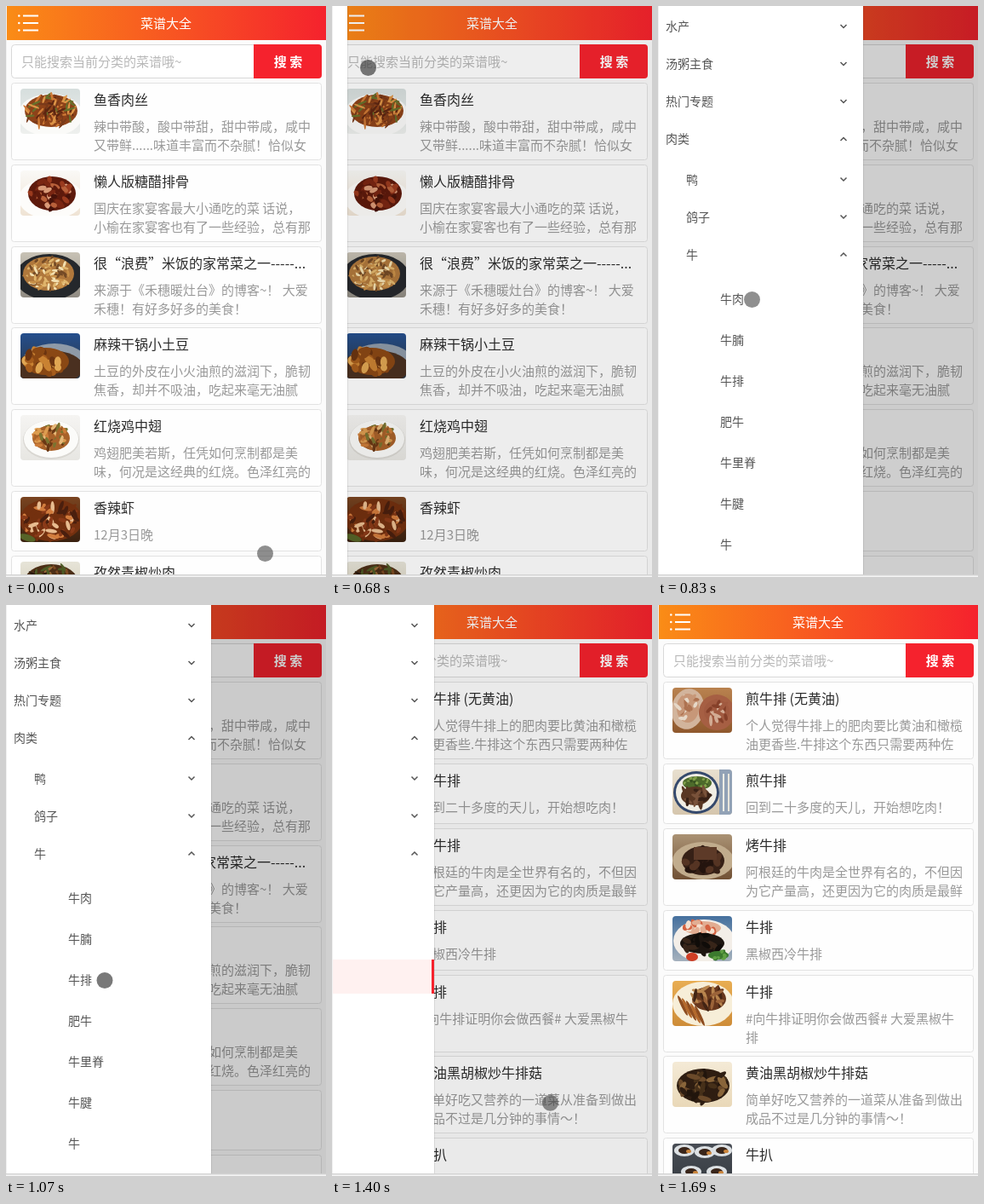
Write an HTML page with a canvas that moves like this. It is 376x670 px and loops after 2.49 s.

```html
<!DOCTYPE html>
<html lang="zh-CN">
<head>
<meta charset="utf-8">
<title>菜谱大全</title>
<style>
html, body { margin: 0; width: 100%; height: 100%; overflow: hidden; background: #fff; }
canvas { display: block; width: 376px; height: 670px; }
</style>
</head>
<body>
<canvas id="stage"></canvas>
<script>
const W = 376, H = 670, LOOP = 2490, FLOOR = 667;
const FONT = '"Noto Sans CJK SC", "Noto Sans CJK", "Noto Sans CJK JP", sans-serif';
const RED = '#f5222d';
const canvas = document.getElementById('stage');
const ctx = canvas.getContext('2d');
const dpr = window.devicePixelRatio || 1;
canvas.width = W * dpr;
canvas.height = H * dpr;

// The screen refreshes only at these moments (ms).
const STEPS = [0, 70, 150, 220, 370, 450, 610, 680, 770, 830, 920, 1000, 1070,
  1140, 1220, 1310, 1400, 1460, 1540, 1620, 1690];

// Keyframes: [time, value, ...]
const CURSOR = [[0, 304.5, 642.5], [150, 78, 34], [370, 30, 20], [450, 26.5, 17.5],
  [610, 32, 36], [680, 42.5, 72.5], [830, 110.5, 344.5], [920, 118, 425], [1000, 116, 440],
  [1140, 116, 441], [1220, 150, 468], [1310, 211.5, 519.5], [1460, 286.5, 627.5],
  [1620, 306.5, 666.5]];
const EDGE = [[610, 0], [680, 18], [770, 165], [830, 241], [1220, 241], [1310, 240],
  [1400, 120], [1460, 17], [1540, 0]];
const DIM = [[600, 0], [680, .065], [830, .19], [860, .2], [1180, .2], [1310, .135],
  [1460, .04], [1540, 0]];
const GLOW = [[1140, 0], [1310, .75], [1400, 1]];

function track(keys, t) {
  if (t <= keys[0][0]) return keys[0].slice(1);
  for (let i = 1; i < keys.length; i++) {
    const a = keys[i - 1], b = keys[i];
    if (t <= b[0]) {
      const k = (t - a[0]) / (b[0] - a[0]);
      return a.slice(1).map((v, j) => v + (b[j + 1] - v) * k);
    }
  }
  return keys[keys.length - 1].slice(1);
}

function text(s, x, cy, size, color, align = 'left', weight = 400) {
  ctx.font = `${weight} ${size}px ${FONT}`;
  ctx.textAlign = align;
  ctx.fillStyle = color;
  ctx.fillText(s, x, cy + size * .38);
}

function rect(x, y, w, h, color) {
  ctx.fillStyle = color;
  ctx.fillRect(x, y, w, h);
}

function panel(x, y, w, h, r, fill, stroke) {
  ctx.beginPath();
  ctx.roundRect(x, y, w, h, r);
  ctx.fillStyle = fill;
  ctx.fill();
  if (stroke) {
    ctx.strokeStyle = stroke;
    ctx.lineWidth = 1;
    ctx.stroke();
  }
}

// Dish pictures, painted in a 70 x 53 box.
let seed = 1;
function rand() {
  seed = (seed * 16807) % 2147483647;
  return seed / 2147483647;
}

function back(top, bottom) {
  const g = ctx.createLinearGradient(0, 0, 0, 53);
  g.addColorStop(0, top);
  g.addColorStop(1, bottom);
  rect(0, 0, 70, 53, g);
}

function oval(x, y, rx, ry, color, turn = 0) {
  ctx.beginPath();
  ctx.ellipse(x, y, rx, ry, turn, 0, 7);
  ctx.fillStyle = color;
  ctx.fill();
}

function heap(x, y, rx, ry, colors, count, len, thick) {
  oval(x, y, rx, ry, colors[0]);
  for (let i = 0; i < count; i++) {
    const a = rand() * 6.28, d = Math.sqrt(rand()) * .92;
    oval(x + Math.cos(a) * rx * d, y + Math.sin(a) * ry * d, len * (.6 + rand() * .5),
      thick, colors[i % colors.length], rand() * 3.14);
  }
}

function pork() {
  back('#d6dedd', '#eef0ee');
  oval(35, 31, 38, 25, '#fafaf8');
  heap(36, 26, 31, 19, ['#8d4219', '#cf7a35', '#5e2611', '#dd9446', '#7a3a1a', '#66702b'], 85, 7, 1.3);
}
function ribs() {
  back('#faf9f6', '#efe3d4');
  oval(36, 33, 38, 24, '#fdfcfa');
  heap(37, 27, 28, 20, ['#5e1a0c', '#9a3a1e', '#471209', '#b8603a', '#7a2612', '#d99a78'], 40, 6, 2.8);
}
function rice() {
  back('#c8c2b5', '#8f8a82');
  oval(34, 29, 40, 27, '#25282c');
  heap(33, 25, 30, 20, ['#b0783c', '#e0b56c', '#744a26', '#f3e0b0', '#c99149'], 95, 4.5, 1.5);
}
function potato() {
  back('#254f8d', '#2b333e');
  oval(40, 34, 38, 22, '#8e9aa8');
  oval(34, 40, 40, 20, '#4a3020');
  heap(30, 33, 27, 16, ['#8a4814', '#c98232', '#6b3410', '#e0a652', '#a65c1c'], 26, 7, 4);
}
function wings() {
  back('#f5f4f2', '#e7e6e2');
  oval(36, 29, 33, 23, '#d9d7d2');
  oval(36, 28, 32, 22, '#fbfbf9');
  heap(36, 27, 22, 15, ['#a8622a', '#dc9c50', '#6a3814', '#cc7c38', '#e6b878', '#7a7430'], 42, 6, 2);
}
function shrimp() {
  back('#7a4420', '#39200f');
  heap(36, 27, 37, 25, ['#73300f', '#d27c3d', '#8a3a18', '#e8bc90', '#4a1f0e'], 65, 7, 2.3);
  oval(8, 48, 10, 4, '#566428', .3);
}
function pepper() {
  back('#e6e4d8', '#d2c9b2');
  heap(36, 25, 32, 22, ['#4c2e16', '#7c4a22', '#4d5a25', '#2c1c0e', '#9a6a38'], 70, 7, 1.5);
}
function rawSteak() {
  back('#b9824f', '#8f582d');
  oval(18, 25, 19, 24, '#d2b49c', .2);
  oval(52, 29, 21, 21, '#a65f43', -.2);
  heap(18, 24, 13, 17, ['#c79778', '#e6d8c8', '#ae7250'], 18, 6, 2);
  heap(52, 28, 15, 14, ['#a15a40', '#d2ab93', '#854029'], 18, 6, 2);
}
function bluePlate() {
  back('#e8dfcf', '#d5c6ad');
  rect(55, 0, 15, 53, '#92a2b6');
  rect(59, 5, 2, 44, '#f0ede5');
  rect(65, 5, 2, 44, '#e8e5db');
  oval(28, 27, 27, 25, '#35496c');
  oval(28, 27, 24, 22, '#f1eee4');
  heap(29, 16, 17, 8, ['#4d6b2b', '#82a14a', '#365020'], 38, 2, 1.8);
  heap(27, 31, 17, 11, ['#593723', '#79523a', '#382116'], 20, 7, 2);
}
function roast() {
  back('#aa9274', '#715135');
  oval(36, 31, 36, 22, '#c1ac8d');
  heap(36, 31, 25, 17, ['#362016', '#553423', '#24140e'], 18, 8, 4);
  rect(25, 15, 27, 15, '#5d3a28');
}
function mixed() {
  back('#45709e', '#a5b1bd');
  oval(37, 29, 36, 25, '#f3eee8');
  heap(35, 14, 22, 8, ['#e2ad92', '#f5dfce', '#d46140'], 23, 5, 3);
  heap(35, 32, 26, 12, ['#1d1510', '#382519', '#100c09'], 18, 8, 3);
  heap(54, 46, 12, 5, ['#3c7a2e', '#60a044'], 14, 3, 2);
  oval(23, 48, 7, 5, '#cf3e25');
}
function fries() {
  back('#e8ad52', '#ce8c38');
  oval(36, 27, 36, 26, '#f7eed8');
  for (let i = 0; i < 5; i++) oval(12 + i * 5, 29 + i * 3, 2, 13, i % 2 ? '#b4692c' : '#8e4d20', -.45);
  heap(43, 21, 20, 14, ['#67371d', '#9b6339', '#432414', '#b8854e'], 24, 8, 2);
}
function mushroom() {
  back('#f4ead6', '#e9d8b8');
  heap(36, 28, 31, 20, ['#2e1d11', '#6b4a2a', '#463019', '#21150c', '#89653a'], 42, 8, 3);
}
function table() {
  back('#484d55', '#353a40');
  for (const [x, y] of [[14, 8], [38, 10], [58, 8], [22, 33], [52, 33]]) {
    oval(x, y, 12, 7, '#dce0e3');
    oval(x, y, 7, 4, '#39251a');
    oval(x + 5, y + 1, 3, 2, '#cc863d');
  }
}

function photo(paint, x, y, n) {
  ctx.save();
  ctx.beginPath();
  ctx.roundRect(x, y, 70, 53, 4);
  ctx.clip();
  ctx.translate(x, y);
  seed = 977 + n * 7919;
  paint();
  ctx.restore();
}

// Cards: [picture, title, description lines...]
const HOME = [
  [pork, '鱼香肉丝', '辣中带酸，酸中带甜，甜中带咸，咸中', '又带鲜......味道丰富而不杂腻！恰似女'],
  [ribs, '懒人版糖醋排骨', '国庆在家宴客最大小通吃的菜 话说，', '小榆在家宴客也有了一些经验，总有那'],
  [rice, '很“浪费”米饭的家常菜之一-----...', '来源于《禾穗暖灶台》的博客~！ 大爱', '禾穗！有好多好多的美食！'],
  [potato, '麻辣干锅小土豆', '土豆的外皮在小火油煎的滋润下，脆韧', '焦香，却并不吸油，吃起来毫无油腻'],
  [wings, '红烧鸡中翅', '鸡翅肥美若斯，任凭如何烹制都是美', '味，何况是这经典的红烧。色泽红亮的'],
  [shrimp, '香辣虾', '12月3日晚'],
  [pepper, '孜然青椒炒肉', '']
];
const STEAK = [
  [rawSteak, '煎牛排 (无黄油)', '个人觉得牛排上的肥肉要比黄油和橄榄', '油更香些.牛排这个东西只需要两种佐'],
  [bluePlate, '煎牛排', '回到二十多度的天儿，开始想吃肉！'],
  [roast, '烤牛排', '阿根廷的牛肉是全世界有名的，不但因', '为它产量高，还更因为它的肉质是最鲜'],
  [mixed, '牛排', '黑椒西冷牛排'],
  [fries, '牛排', '#向牛排证明你会做西餐# 大爱黑椒牛', '排'],
  [mushroom, '黄油黑胡椒炒牛排菇', '简单好吃又营养的一道菜从准备到做出', '成品不过是几分钟的事情～！'],
  [table, '牛扒', '']
];

function drawHeader() {
  const g = ctx.createLinearGradient(1, 0, W, 0);
  g.addColorStop(0, '#fa8c16');
  g.addColorStop(1, RED);
  rect(1, 0, W - 1, 40, g);
  text('菜谱大全', 188, 20, 15, '#fff', 'center');
  for (const y of [11.5, 20, 28.5]) {
    rect(20, y - 1, 18, 2, '#fff');
    oval(15.3, y, 1.3, 1.3, '#fff');
  }
}

function drawSearch() {
  panel(6.5, 45.5, 285, 39, [4, 0, 0, 4], '#fff', '#d9d9d9');
  text('只能搜索当前分类的菜谱哦~', 18, 65.5, 15, '#b8b8b8');
  panel(291, 45, 80, 40, [0, 4, 4, 0], RED);
  text('搜 索', 331.5, 65.5, 15, '#fff', 'center', 700);
}

function drawCards(cards) {
  let top = 90;
  cards.forEach(([paint, title, ...lines], n) => {
    const y = Math.round(top), tall = lines.length > 1 ? 95.75 : 76;
    panel(6.5, y + .5, 364, Math.round(tall) - 6, 3, '#fefefe', '#e2e2e2');
    photo(paint, 17, y + 7, n);
    text(title, 103, y + 19.5, 16, '#2b2b2b');
    lines.forEach((s, i) => text(s, 103, y + 51 + i * 22, 15, '#999'));
    top += tall;
  });
}

// Menu rows: [label, x, y, arrow]; arrow 1 = closed, -1 = open
const MENU = [
  ...['水产', '汤粥主食', '热门专题', '肉类'].map((s, i) => [s, 8, 24 + i * 44, i < 3 ? 1 : -1]),
  ...['鸭', '鸽子', '牛'].map((s, i) => [s, 32, 203.5 + i * 44, i < 2 ? 1 : -1]),
  ...['牛肉', '牛腩', '牛排', '肥牛', '牛里脊', '牛腱', '牛'].map((s, i) => [s, 72, 344 + i * 48, 0])
];

function drawDrawer(edge, glow) {
  if (edge <= 1) return;
  ctx.save();
  ctx.beginPath();
  ctx.rect(1, 0, W, FLOOR);
  ctx.clip();
  ctx.translate(edge - 240, 0);
  rect(240, 0, 1, FLOOR, 'rgba(0,0,0,.08)');
  rect(0, 0, 240, FLOOR, '#fff');
  ctx.globalAlpha = glow;
  rect(0, 416, 240, 40, '#fff1f0');
  rect(237, 416, 3, 40, RED);
  ctx.globalAlpha = 1;
  for (const [label, x, y, arrow] of MENU) {
    text(label, x, y, 14, '#555');
    if (label === '牛排') {
      ctx.globalAlpha = glow * .7;
      text(label, x, y, 14, RED);
      ctx.globalAlpha = 1;
    }
    if (arrow) {
      ctx.beginPath();
      ctx.moveTo(213.5, y - 2 * arrow);
      ctx.lineTo(217, y + 1.5 * arrow);
      ctx.lineTo(220.5, y - 2 * arrow);
      ctx.strokeStyle = '#555';
      ctx.lineWidth = 1.5;
      ctx.stroke();
    }
  }
  ctx.restore();
}

function drawCursor(t) {
  if ((t >= 220 && t < 370) || t >= 1690) return;
  const [x, y] = track(CURSOR, t);
  const pressed = (t >= 450 && t < 770) || (t >= 1070 && t < 1220);
  oval(x, y, 9.5, 9.5, `rgba(64,64,64,${pressed ? .7 : .59})`);
}

function draw(t) {
  ctx.setTransform(dpr, 0, 0, dpr, 0, 0);
  rect(0, 0, W, H, '#fff');
  rect(1, 0, W - 1, FLOOR, '#fbfbfb');
  drawHeader();
  drawSearch();
  drawCards(t < 1220 ? HOME : STEAK);
  rect(1, 0, W - 1, FLOOR, `rgba(0,0,0,${track(DIM, t)[0]})`);
  drawDrawer(track(EDGE, t)[0], track(GLOW, t)[0]);
  rect(0, 0, 1, FLOOR, '#f0f0f0');
  ['#d2d2d2', '#e6e6e6', '#f4f4f4'].forEach((c, i) => rect(0, FLOOR + i, W, 1, c));
  drawCursor(t);
}

const start = performance.now();
let shown = -1;
function tick() {
  const t = (performance.now() - start) % LOOP;
  const step = STEPS.filter(s => s <= t).pop();
  if (step !== shown) {
    shown = step;
    draw(step);
  }
  requestAnimationFrame(tick);
}
tick();
</script>
</body>
</html>
```
